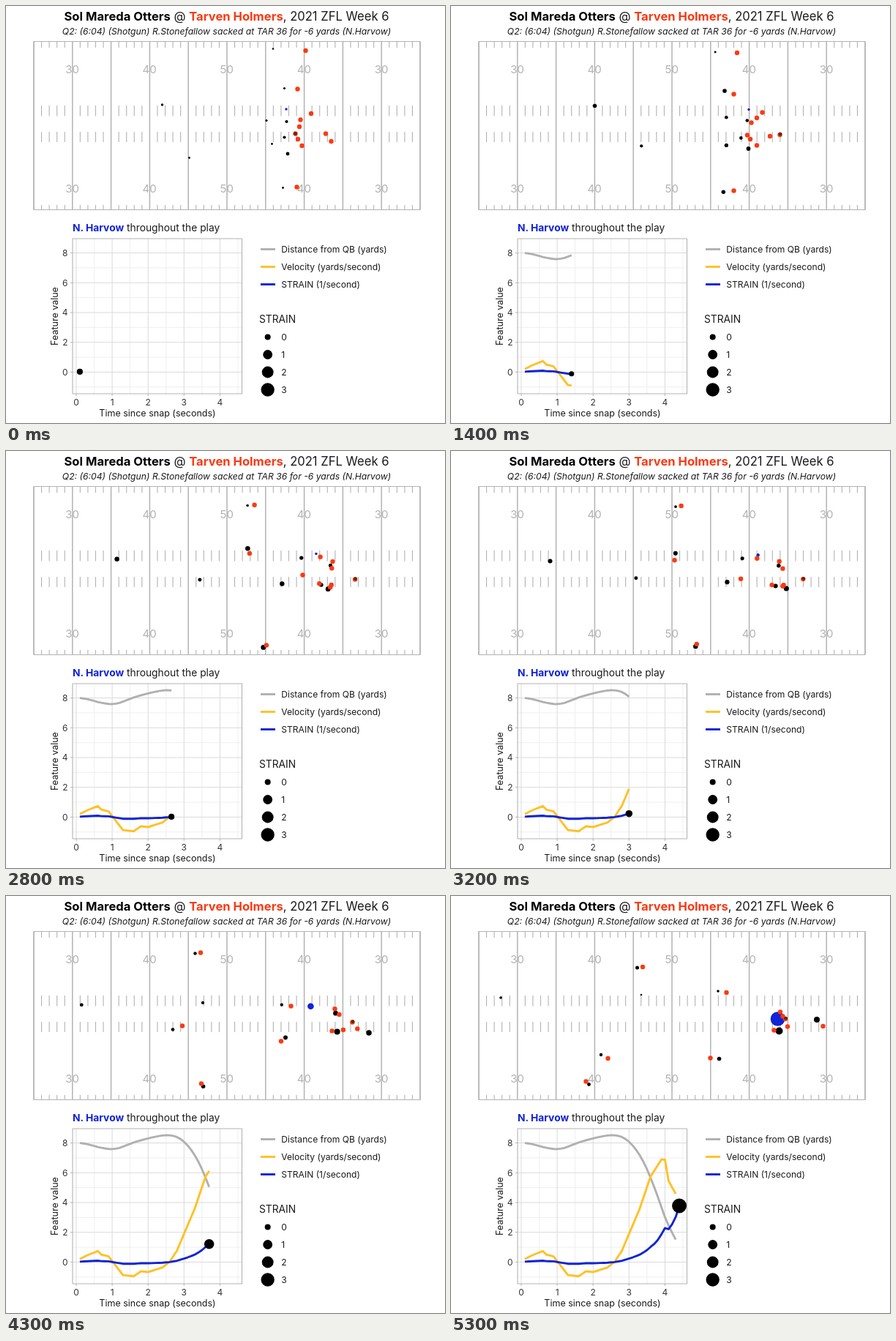
An HTML page for the animation above (6000 ms loop, 600 px wide and 570 px high).

```html
<!DOCTYPE html>
<html lang="en">
<head>
<meta charset="utf-8">
<title>Pass rush play</title>
<style>
html, body { margin: 0; width: 100%; height: 100%; overflow: hidden; background: #fff; }
svg { display: block; width: 600px; height: 570px; }
text { font-family: Inter, Roboto, sans-serif; font-size: 12.5px; fill: #1a1a1a; }
.title { font-size: 16.6px; }
.sub { font-size: 12.2px; font-style: italic; }
.head { font-size: 13.8px; }
.yard { font-size: 15px; fill: #b3b3b3; }
.tick { font-size: 12px; fill: #333; }
.key { font-size: 12.1px; }
.mid { text-anchor: middle; }
.end { text-anchor: end; }
.bold { font-weight: 700; }
path { fill: none; stroke-linejoin: round; }
</style>
</head>
<body>
<svg viewBox="0 0 600 570">
  <text class="title mid" x="301.5" y="20"><tspan class="bold" fill="#000">Sol Mareda Otters</tspan> @ <tspan class="bold" fill="#fa3a14">Tarven Holmers</tspan>, 2021 ZFL Week 6</text>
  <text class="sub mid" x="301.5" y="39">Q2: (6:04) (Shotgun) R.Stonefallow sacked at TAR 36 for -6 yards (N.Harvow)</text>
  <g id="field"></g>
  <g id="men"></g>
  <text class="head" x="91" y="308"><tspan class="bold" fill="#1023d6">N. Harvow</tspan> throughout the play</text>
  <g id="chart"></g>
  <text class="mid" x="207" y="561">Time since snap (seconds)</text>
  <text class="mid" transform="translate(70.5 424) rotate(-90)">Feature value</text>
  <g id="legend"></g>
</svg>
<script>
const GREY = '#b3b3b3', ORANGE = '#fa3a14', BLUE = '#1023d6', YELLOW = '#ffc125';
const LAST = 43;   // final sample; samples are a tenth of a second apart
const $ = id => document.getElementById(id);

function add(parent, tag, attrs, text) {
  const el = document.createElementNS('http://www.w3.org/2000/svg', tag);
  for (const key in attrs) el.setAttribute(key, attrs[key]);
  if (text !== undefined) el.textContent = text;
  parent.appendChild(el);
  return el;
}
const line = (parent, d, stroke, width) =>
  add(parent, 'path', { d, stroke, 'stroke-width': width });
const dot = (parent, cx, cy, r, fill) => add(parent, 'circle', { cx, cy, r, fill });
const label = (parent, x, y, cls, text) => add(parent, 'text', { x, y, class: cls }, text);
function place(el, x, y, r) {
  el.setAttribute('cx', x);
  el.setAttribute('cy', y);
  el.setAttribute('r', r);
}

// Field
const field = $('field');
let yards = '', hashes = '';
for (let i = 0; i <= 50; i++) {
  const x = (38 + i * 10.56).toFixed(2);
  if (i % 5 === 0) yards += `M${x} 48.5V278.5`;
  else hashes += `M${x} 49v8M${x} 136v14.5M${x} 172v14M${x} 272v6`;
}
line(field, hashes, GREY, 1.1);
line(field, yards, GREY, 1.5);
line(field, 'M38 48.5H566V278.5H38Z', GREY, 1.1);
for (let i = 0; i < 5; i++) {
  for (const y of [92, 255.3]) label(field, 90.6 + i * 105.6, y, 'yard mid', 50 - 10 * Math.abs(i - 2));
}

// Chart
const chart = $('chart');
const timeX = t => 96 + 49.1 * t;
const valueY = v => 500.4 - 20.35 * v;
let minor = '', major = '', ticks = '';
for (let i = 0; i < 5; i++) {
  const x = timeX(i), y = valueY(2 * i);
  minor += `M${timeX(i + 0.5)} 318V530M91 ${valueY(2 * i - 1)}H323`;
  major += `M${x} 318V530M91 ${y}H323`;
  ticks += `M${x} 530v3M88 ${y}h3`;
  label(chart, x, 546, 'tick mid', i);
  label(chart, 84.5, y + 4.4, 'tick end', 2 * i);
}
line(chart, minor, '#ebebeb', 0.8);
line(chart, major, '#dadada', 1);
line(chart, ticks, GREY, 1);
line(chart, 'M91 318H322.5V530H91Z', GREY, 1.1);

// Legend
const legend = $('legend');
const strainR = s => 1.78 + 4.05 * Math.sqrt(s + 0.3);
[['Distance from QB (yards)', '#b0b0b0'], ['Velocity (yards/second)', YELLOW], ['STRAIN (1/second)', BLUE]]
  .forEach(([name, color], i) => {
    const y = 332.5 + 24 * i;
    line(legend, `M348 ${y}H368`, color, 2.9);
    label(legend, 376.3, y + 4.5, 'key', name);
  });
label(legend, 346, 433.3, 'head', 'STRAIN');
for (let s = 0; s < 4; s++) {
  dot(legend, 357.7, 452.5 + 24 * s, strainR(s), '#000');
  label(legend, 376.3, 457 + 24 * s, 'key', s);
}

// Piecewise linear through [t, value] points
function ramp(points) {
  return t => {
    let i = 1;
    while (i < points.length - 1 && t > points[i][0]) i++;
    const [t0, a] = points[i - 1], [t1, b] = points[i];
    return a + (b - a) * (t - t0) / (t1 - t0);
  };
}

// Smooth, overshoot-free curve, slow at the start
function curve(keys, vals) {
  const n = keys.length - 1, slope = [], m = [];
  for (let i = 0; i < n; i++) slope[i] = (vals[i + 1] - vals[i]) / (keys[i + 1] - keys[i]);
  m[0] = 0.4 * slope[0];
  m[n] = slope[n - 1];
  for (let i = 1; i < n; i++) {
    const a = slope[i - 1], b = slope[i];
    m[i] = a * b > 0 ? 2 * a * b / (a + b) : 0;
  }
  return u => {
    let i = 0;
    while (i < n - 1 && u > keys[i + 1]) i++;
    const h = keys[i + 1] - keys[i], s = (u - keys[i]) / h, q = 1 - s;
    return vals[i] * (1 + 2 * s) * q * q + m[i] * h * s * q * q
      + vals[i + 1] * s * s * (3 - 2 * s) - m[i + 1] * h * s * s * q;
  };
}

// Closing speed sets the distance, and speed over distance is the strain
const closing = ramp([
  [0.1, 0.2], [0.3, 0.45], [0.6, 0.74], [0.7, 0.5], [0.9, 0.38], [1.3, -0.87], [1.6, -0.95], [1.8, -0.62], [2, -0.67],
  [2.4, -0.37], [2.6, 0.02], [2.8, 0.75], [3.3, 3.6], [3.6, 5.75], [3.9, 6.89], [4, 6.89], [4.1, 5.46], [4.4, 4.15]]);
const gap = [], speed = [], strain = [];
for (let i = 0, d = 8; i <= LAST; i++) {
  const v = closing(0.1 + i / 10);
  if (i) d -= v / 10;
  gap[i] = d;
  speed[i] = v;
  strain[i] = v / d;
}
function at(vals, u) {
  const i = Math.min(Math.floor(u), LAST - 1);
  return vals[i] + (vals[i + 1] - vals[i]) * (u - i);
}

// A route runs through [sample, x, y] points
function route(...points) {
  const keys = points.map(p => p[0]);
  const x = curve(keys, points.map(p => p[1])), y = curve(keys, points.map(p => p[2]));
  return u => [x(u), y(u)];
}
// Stay beside a leader while the offset eases from one value to another
function mark(leader, from, to, by) {
  return u => {
    const e = (1 - Math.cos(Math.PI * Math.min(1, u / by))) / 2;
    return leader(u).map((v, i) => v + from[i] + (to[i] - from[i]) * e);
  };
}

const wideTop = route([0, 409.5, 61], [13, 391, 64], [26, 337, 74], [36, 266, 77.5], [43, 262, 97]);
const slot = route([0, 398.5, 113.5], [13, 386.5, 120.5], [26, 330, 141], [36, 241, 177.5], [43, 214.5, 222]);
const wideLow = route([0, 397.5, 247.5], [13, 386.5, 252.5], [26, 354, 265.5], [36, 267, 256.5], [43, 184.5, 253.5]);
const tightEnd = route([0, 417, 147], [24, 431, 144.5], [36, 389.5, 150.5], [43, 376.5, 132]);
const leftTackle = route([0, 402.5, 155.5], [13, 418, 153], [28, 448.5, 151], [43, 450, 158.5]);
const leftGuard = route([0, 401, 165], [13, 410.5, 159.5], [32, 456, 161], [43, 453.5, 164.5]);
const center = route([0, 395.5, 174.5], [19, 412, 178], [34, 446, 184.5], [43, 441.5, 183.5]);
const rightGuard = route([0, 399, 182], [13, 409, 182], [34, 461, 183.5], [43, 460, 178.5]);
const rightTackle = route([0, 404.5, 191], [13, 418, 190.5], [26, 444.5, 186], [43, 508.5, 178]);
const back = route([0, 444.5, 185], [13, 436, 178], [25.5, 405.5, 169.5], [36, 376, 198.5], [43, 354.5, 221.5]);
const passer = route([0, 437, 174.5], [13, 449.5, 176], [30, 481.5, 175], [43, 457, 168]);

const men = [];
const man = (color, path, size) => men.push({ el: dot($('men'), 0, 0, 0, color), path, size });
// A defender's dot goes from its first size through a middle one to its last
const defender = (path, ...sizes) => man('#000', path, curve([0, 22, LAST], sizes));

defender(mark(wideTop, [-44.5, -2.5], [-7.5, 1], 30), 1.3, 1.7, 2.5);
defender(mark(wideLow, [-19, 1], [4, 4], LAST), 1.4, 3.4, 2.4);
defender(mark(tightEnd, [-61, 9.5], [-11.5, -2], 40), 1.6, 2.7, 1.8);
defender(mark(leftTackle, [-19, 2.5], [1, 6], 36), 2.1, 2.4, 4);
defender(mark(center, [-15, 5], [7, 1], 36), 2.1, 2.5, 5);
defender(route([0, 380.5, 112.5], [13, 374, 116], [26, 328, 134], [34, 273, 147], [43, 260, 135]), 1.6, 3.4, 1.3);
defender(route([0, 213.5, 135], [13, 196.5, 136.5], [32, 122, 151.5], [43, 68, 139]), 1.7, 3.3, 1.8);
defender(route([0, 363.5, 188.5], [15, 377, 190.5], [30, 377.5, 179], [36, 382, 193.5], [43, 366.5, 222.5]), 1.4, 3.2, 2.8);
defender(route([0, 385, 202], [13, 406.5, 195], [26, 442, 188.5], [36, 496, 187], [43, 500, 169]), 2.4, 3.3, 4);
defender(route([0, 250.5, 207.5], [24, 266.5, 177], [32, 241, 173], [43, 205, 217]), 1.4, 2.5, 2.2);
man(BLUE, route([0, 383, 141], [13, 407, 141.5], [25, 424, 140.5], [34, 413.5, 147.5], [43, 446.5, 168]),
  u => 1.7 + 2.15 * Math.max(0, at(strain, u)));
for (const path of [wideTop, slot, wideLow, tightEnd, leftTackle, leftGuard, center, rightGuard, rightTackle, back, passer]) {
  man(ORANGE, path, () => 3.2);
}
man('rgba(80,36,12,.88)', mark(passer, [-41.5, 0], [0.5, -0.8], 7), () => 2.4);

const series = [[gap, '#b0b0b0', LAST - 1], [speed, YELLOW, LAST - 1], [strain, BLUE, LAST]]
  .map(([vals, color, last]) => ({ vals, last, el: line(chart, '', color, 2.9) }));
const marker = dot(chart, 0, 0, 4, '#000');

// Timing: 64 steps, alternating 50 and 100 ms, later all 100 ms
const LOOP = 6000, STEPS = 64;
const startOf = k => k > 43 ? 100 * k - 1100 : k % 2 ? 75 * k - 25 : Math.max(0, 75 * k - 50);
// Every sample falls on a whole step; steps between two samples blend them
const stepOf = i => Math.round(i * STEPS / LAST);
function progress(k) {
  let i = 0;
  while (i < LAST - 1 && stepOf(i + 1) <= k) i++;
  return i + (k - stepOf(i)) / (stepOf(i + 1) - stepOf(i));
}
const sampleX = u => timeX(0.1 + u / 10);

function draw(k) {
  const u = progress(k);
  for (const { el, path, size } of men) place(el, ...path(u), size(u));
  for (const { vals, last, el } of series) {
    const end = Math.min(u, last), points = [];
    for (let i = 0; i < end; i++) points.push(`${sampleX(i)} ${valueY(vals[i])}`);
    points.push(`${sampleX(end)} ${valueY(at(vals, end))}`);
    el.setAttribute('d', 'M' + points.join('L'));
  }
  const s = at(strain, u);
  place(marker, sampleX(u), valueY(s), strainR(s));
}

const begin = performance.now();
let shown = -1;
function tick() {
  const ms = (performance.now() - begin) % LOOP;
  let k = 0;
  while (k < STEPS && startOf(k + 1) <= ms) k++;
  if (k !== shown) draw(shown = k);
  requestAnimationFrame(tick);
}
tick();
</script>
</body>
</html>
```
